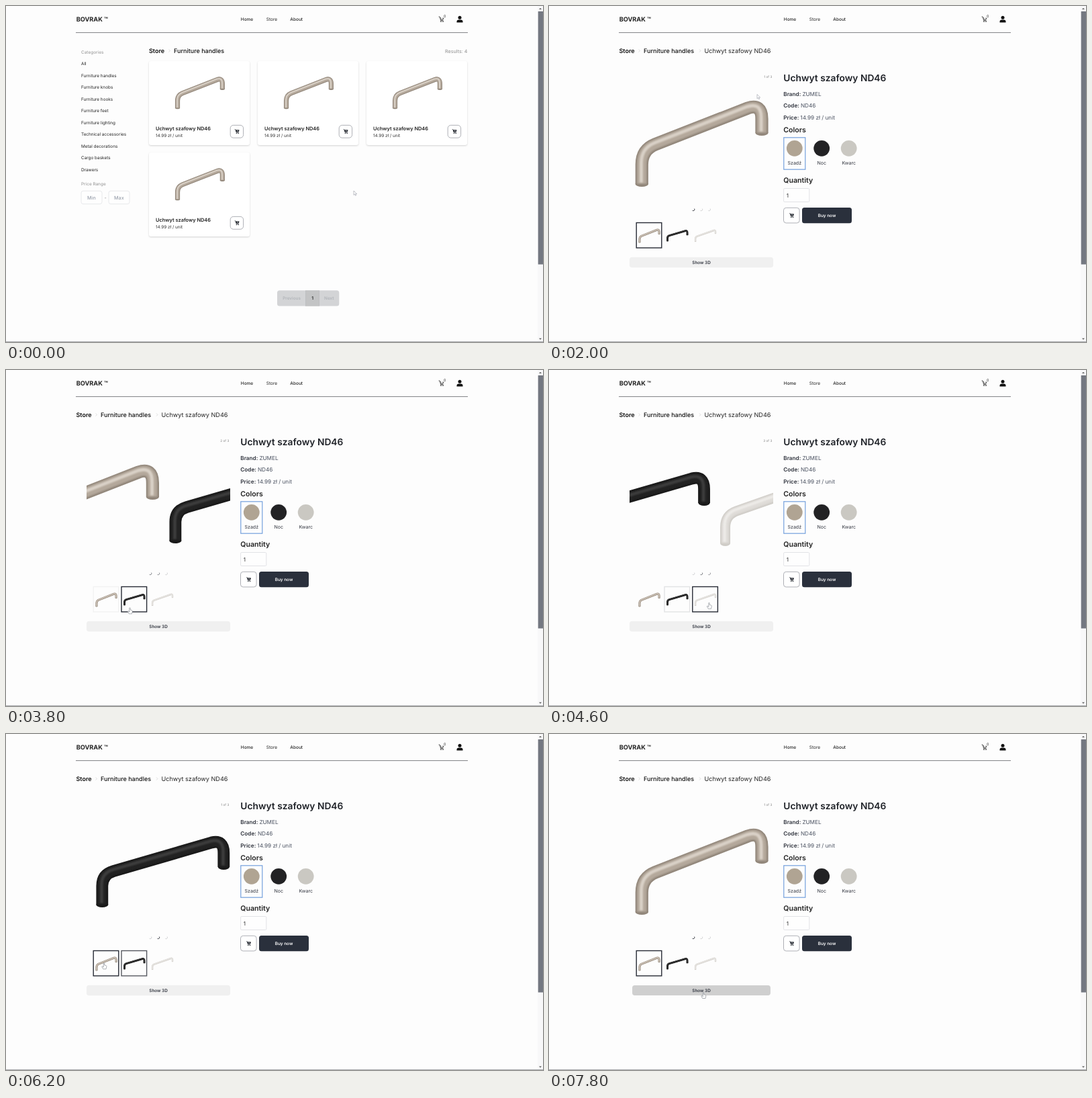
An HTML page that plays this animation: 800x500 px, repeating every 8000 ms.

```html
<!DOCTYPE html>
<html lang="en">
<head>
<meta charset="utf-8">
<title>Furniture store</title>
<style>
  html, body { margin: 0; width: 100%; height: 100%; overflow: hidden; background: #fdfdfd; }
  svg { display: block; width: 800px; height: 500px; }
  text { font-family: Inter, "Open Sans", sans-serif; text-rendering: geometricPrecision; white-space: pre; }
  .card { filter: drop-shadow(0 1.2px 1.3px rgba(0, 0, 0, .17)); }
</style>
</head>
<body>
<svg id="stage" viewBox="0 0 800 500"></svg>
<script>
const LOOP = 8000, STEP = 200, PAGE_CHANGE = 2000, PITCH = 214;
const PRODUCT = 'Uchwyt szafowy ND46', CODE = 'ND46', PRICE = '14.99 zł / unit';
const $ = id => document.getElementById(id);

// Text is placed by the vertical centre of its capitals.
const text = (x, y, str, size, weight = 400, fill = '#222', anchor = 'start', id = '') =>
  `<text ${id && `id="${id}"`} x="${x}" y="${(y + size * .36).toFixed(2)}" font-size="${size}"
    font-weight="${weight}" fill="${fill}" text-anchor="${anchor}">${str}</text>`;
const rect = (x, y, w, h, r, fill, stroke = 'none', extra = '') =>
  `<rect x="${x}" y="${y}" width="${w}" height="${h}" rx="${r}" fill="${fill}" stroke="${stroke}" ${extra}/>`;
const use = (id, x, y, s = 1) => `<use href="#${id}" transform="translate(${x} ${y}) scale(${s})"/>`;
const chevron = x => `<path d="M${x - 1} 64.6l2 2-2 2" fill="none" stroke="#d4d4d4" stroke-width=".8"/>`;

// A bent tube: dark edge, body and soft highlight, with round feet.
function handle(id, path, feet, width, [edge, body, light], glow) {
  const line = (color, w, dy, extra = '') =>
    `<path d="${path}" fill="none" stroke="${color}" stroke-width="${w}" transform="translate(${-dy * .4} ${-dy})" ${extra}/>`;
  const ends = feet.map(([x, y, rx]) =>
    `<ellipse cx="${x}" cy="${y}" rx="${rx}" ry="4" fill="${edge}"/>`).join('');
  return `<g id="${id}">${ends}${line(edge, width, 0)}
    ${line(body, width * .74, .4, 'filter="url(#soft)"')}
    ${line(light, width * .26, 2.2, `filter="url(#soft)" opacity="${glow}"`)}</g>`;
}

const defs = `<defs>
  <filter id="soft" x="-10%" y="-10%" width="120%" height="120%"><feGaussianBlur stdDeviation="1.3"/></filter>
  <clipPath id="viewport"><rect x="120" y="101" width="214" height="198"/></clipPath>
  ${handle('beige', 'M138.3 265V236Q138.3 214 158 206L296 152Q317 145 317 168V189',
    [[138.3, 265, 9.7], [317, 189, 9.5]], 19.2, ['#91867a', '#b4a89b', '#ded6cc'], .9)}
  ${handle('black', 'M137 254V226Q137 209 154 204L300 161.5Q318 157 318 177V198',
    [[137, 254, 9], [318, 198, 8.5]], 17.8, ['#191919', '#242424', '#484848'], .7)}
  ${handle('white', 'M135.5 258V234Q135.5 216 152 210L303 157Q319 152 319 170V185',
    [[135.5, 258, 7.5], [319, 185, 7.3]], 15, ['#cfccc7', '#dfdcd8', '#f0eeeb'], .9)}
  <g id="cart" fill="#20242c" stroke="#20242c" stroke-width=".8" stroke-linejoin="round">
    <path d="M-4-3.4h1.7L-.9 1.8H3.1" fill="none"/>
    <path d="M-2-2.4H3.7L2.8.5H-1.2Z"/>
    <circle cx="-.7" cy="3.1" r=".55"/><circle cx="2.6" cy="3.1" r=".55"/>
    <path d="M.9-2.1v2M-.1-1.1h2" stroke="#fff" stroke-width=".55"/>
  </g>
  <g id="arrow"><path d="M0 0V6.3L1.6 4.9 2.6 7.2 3.6 6.8 2.6 4.6H4.7Z" fill="#fff" stroke="#8b909c" stroke-width=".55"/></g>
  <g id="hand"><path d="M-.7.2Q0-.6.7.2V3L3.2 3.6Q4 4 3.8 5.2L3 8.8H-1.2L-3.2 5.4Q-3 4.3-1.9 5L-.7 6Z"
    fill="#fff" stroke="#777c85" stroke-width=".6" stroke-linejoin="round"/></g>
</defs>`;

const frame = rect(0, 0, 800, 500, 0, '#fdfdfd') +
  text(104.7, 19.7, 'BOVRAK ™', 9.2, 700) +
  text(359, 19.9, 'Home', 6.5, 500, '#222', 'middle') +
  text(396, 19.9, 'Store', 6.5, 400, '#222', 'middle') +
  text(432.7, 19.9, 'About', 6.5, 500, '#222', 'middle') +
  `<g fill="none" stroke="#222" stroke-width=".8"><path d="M644.6 16h1.6l1.4 5.4h3.8M646.8 18h1.6m2 0h1.4l-.7 2h-3.6"/>
    <circle cx="648" cy="23" r=".6"/><circle cx="651" cy="23" r=".6"/></g>` +
  text(653.7, 15.2, '0', 5.2, 400, '#222', 'middle') +
  `<g fill="#111"><circle cx="676" cy="17.2" r="2.5"/><path d="M671.5 24.4v-1.2q0-2.7 3-2.7h3q3 0 3 2.7v1.2Z"/></g>` +
  rect(104, 39, 584, 1.1, 0, '#8b8c8f') +
  rect(792, 0, 8, 500, 0, '#f8f8f9') + rect(792.7, 8, 7.3, 376.5, 0, '#747881') +
  '<path d="M794 5l2-2 2 2ZM794 494.5l2 2 2-2Z" fill="#555"/>' +
  rect(0, 499, 800, 1, 0, '#a9abae');

const categories = ['All', 'Furniture handles', 'Furniture knobs', 'Furniture hooks', 'Furniture feet',
  'Furniture lighting', 'Technical accessories', 'Metal decorations', 'Cargo baskets', 'Drawers'];

const card = (x, y) => rect(x, y, 150, 125, 3, '#fff', 'none', 'class="card"') +
  use('beige', x + 75.7 - 227 * .374, y + 47 - 204 * .374, .374) +
  text(x + 10, y + 100, PRODUCT, 7.4, 600) +
  text(x + 10, y + 111, PRICE, 6.4, 400, '#333') +
  rect(x + 121.2, y + 95.4, 19.4, 18.8, 4.5, '#fff', '#a5a8ae', 'stroke-width=".9"') +
  use('cart', x + 131, y + 104.7, .85);

const priceField = (x, label) => rect(x, 275.2, 31, 19.4, 3, '#fefefe', '#e2e4e7', 'stroke-width=".8"') +
  text(x + 15.4, 285.2, label, 7.2, 500, '#9aa1ad', 'middle');

const store = `<g id="store">` +
  text(112, 68.8, 'Categories', 6.4, 500, '#a0a0a0') +
  categories.map((name, i) => text(112, 86 + i * 17.5, name, 6.4)).join('') +
  text(112, 265, 'Price Range', 6.4, 500, '#a0a0a0') +
  priceField(112, 'Min') + text(148, 285.2, '-', 7, 400, '#888', 'middle') + priceField(153, 'Max') +
  text(213, 66.6, 'Store', 9, 600, '#111') + chevron(243.5) +
  text(250, 66.6, 'Furniture handles', 9, 500, '#111') +
  text(687.5, 67.4, 'Results: 4', 7.2, 400, '#8e8e8e', 'end') +
  [[213, 82], [375, 82], [537, 82], [213, 218]].map(p => card(...p)).join('') +
  rect(404, 423.2, 92.3, 23.4, 3.5, '#d3d4d6') + rect(446.6, 423.2, 19.8, 23.4, 0, '#c3c4c5') +
  rect(446.3, 423.2, .6, 23.4, 0, '#b4b5b7') + rect(466, 423.2, .6, 23.4, 0, '#b4b5b7') +
  text(425.6, 435, 'Previous', 6.4, 600, '#b2b5ba', 'middle') +
  text(456.6, 435, '1', 6.6, 600, '#222', 'middle') +
  text(481.3, 435, 'Next', 6.4, 600, '#b2b5ba', 'middle') + `</g>`;

const detail = (y, label, value) => text(349.3, y,
  `${label}: <tspan font-weight="400" fill="#4a5160">${value}</tspan>`, 8.2, 600, '#30343e');
const swatch = (x, color, label) => `<circle cx="${x}" cy="211.8" r="11.9" fill="${color}"/>` +
  text(x, 233.7, label, 7, 400, '#30343e', 'middle');
const thumb = (i, color, cy) => {
  const x = 130.2 + i * 41.8;
  return use(color, x + 19.2 - 227 * .163, 341.8 - cy * .163, .163) +
    rect(x, 322.5, 37.6, 37.4, 0, 'none', '#272b35', `id="thumb${i}" stroke-width="1.4"`);
};
const dot = i => `<path id="dot${i}" d="M${216.6 + i * 11.8} 301.6a2 2 0 0 1-3 2.6"
  fill="none" stroke="#30343c" stroke-width=".9"/>`;

const product = `<g id="product">` +
  text(104.5, 66.6, 'Store', 9, 600, '#111') + chevron(134.5) +
  text(141, 66.6, 'Furniture handles', 9, 500, '#111') + chevron(225) +
  text(231.5, 66.6, PRODUCT, 9.1, 400, '#222') +
  text(332.3, 105.3, '', 4.7, 400, '#808080', 'end', 'counter') +
  `<g clip-path="url(#viewport)"><g id="slides">` +
  ['beige', 'black', 'white'].map((c, i) => use(c, i * PITCH, 0)).join('') + `</g></g>` +
  [0, 1, 2].map(dot).join('') +
  thumb(0, 'beige', 204) + thumb(1, 'black', 205) + thumb(2, 'white', 205) +
  `<g id="show3d">${rect(120, 373.7, 214, 15.5, 3.8, '#f0f0f0', 'none', 'id="show3dBack"')}</g>` +
  text(227, 381.5, 'Show 3D', 6.4, 600, '#30343e', 'middle') +
  text(349.3, 107.4, PRODUCT, 13.8, 600, '#1f2228') +
  detail(130.8, 'Brand', 'ZUMEL') + detail(148.3, 'Code', CODE) + detail(165.8, 'Price', PRICE) +
  text(349.3, 184.2, 'Colors', 10.6, 600) +
  rect(349.8, 195.8, 32, 47.4, 0, 'none', '#74a0dc', 'stroke-width="1.2"') +
  swatch(365.8, '#b0a493', 'Szadź') + swatch(406.2, '#222224', 'Noc') + swatch(446.7, '#cac8c2', 'Kwarc') +
  text(349.3, 259.6, 'Quantity', 10.6, 600) +
  rect(349.6, 271.5, 38.2, 20, 1.5, '#fefefe', '#dcdee1', 'stroke-width=".8"') +
  text(353.8, 281.7, '1', 8) +
  rect(349.5, 300.3, 23.6, 22.6, 3.8, '#fff', '#a5a8ae', 'stroke-width=".9"') + use('cart', 361.4, 311.7, .85) +
  rect(377, 300, 74, 23.2, 3.5, '#2a303c') +
  text(414, 311.7, 'Buy now', 6.4, 600, '#fff', 'middle') + `</g>`;

$('stage').innerHTML = defs + frame + store + product +
  `<g id="cursor">${use('arrow', 0, 0)}${use('hand', 0, 0)}</g>`;
const [arrow, hand] = $('cursor').children;

// Cursor tip: time, x, y
const cursorPath = [
  [0, 518, 275], [400, 518, 275], [1200, 310, 131.5], [2000, 310, 131.5], [3000, 214, 322],
  [3400, 186, 359], [3600, 184.5, 354], [4000, 184.5, 354], [4300, 238.5, 346.5], [4900, 238.5, 346.5],
  [5300, 184, 344], [5700, 184, 344], [6100, 146, 341], [6250, 146, 341], [6600, 342, 235],
  [6900, 368, 156], [7100, 355, 190], [7600, 236, 380], [7800, 230, 384.7], [8000, 230, 384.7]];
// Slide changes: start time, slide index
const slideMoves = [[0, 0], [3610, 1], [4424, 2], [5430, 1], [6156, 0]];
// Spans in which each thumbnail is selected or hovered
const thumbSpans = [[[0, 3610], [6000, LOOP]], [[3200, 4424], [5150, 6156]], [[4200, 5430]]];

const clamp = v => Math.min(1, Math.max(0, v));
const ease = u => .5 - .5 * Math.cos(Math.PI * clamp(u));

function cursorAt(t) {
  const i = Math.max(1, cursorPath.findIndex(key => key[0] > t));
  const [t0, x0, y0] = cursorPath[i - 1], [t1, x1, y1] = cursorPath[i];
  const k = ease((t - t0) / (t1 - t0));
  return [x0 + (x1 - x0) * k, y0 + (y1 - y0) * k];
}

function draw(t) {
  const onStore = t < PAGE_CHANGE;
  $('store').style.display = onStore ? '' : 'none';
  $('product').style.display = onStore ? 'none' : '';

  const [x, y] = cursorAt(t);
  const pointing = onStore ? x < 363 && y < 207 : y > 322 && x > 120 && x < 334;
  $('cursor').setAttribute('transform', `translate(${x} ${y})`);
  arrow.style.display = pointing ? 'none' : '';
  hand.style.display = pointing ? '' : 'none';

  let position = 0, active = 0;
  for (const [start, index] of slideMoves) {
    if (t < start) break;
    position += (index - active) * ease((t - start) / 400);
    active = index;
  }
  $('slides').setAttribute('transform', `translate(${-position * PITCH} 0)`);
  $('counter').textContent = `${active + 1} of 3`;

  thumbSpans.forEach((spans, i) => {
    const levels = spans.map(([on, off]) => t < on ? 0 : clamp(1 - (t - off) / 200));
    $('thumb' + i).setAttribute('opacity', Math.max(...levels));
    $('dot' + i).setAttribute('opacity', .22 + .78 * clamp(1 - Math.abs(position - i)));
  });

  const hover = ease((t - 7480) / 160), shade = 240 - 33 * hover;
  $('show3dBack').setAttribute('fill', `rgb(${shade},${shade},${shade})`);
  $('show3d').setAttribute('transform', `translate(227 381.4) scale(${1 - .038 * hover}) translate(-227 -381.4)`);
}

const begin = performance.now();
function tick() {
  const t = (performance.now() - begin) % LOOP;
  draw(Math.floor(t / STEP) * STEP);
  requestAnimationFrame(tick);
}
tick();
</script>
</body>
</html>
```
